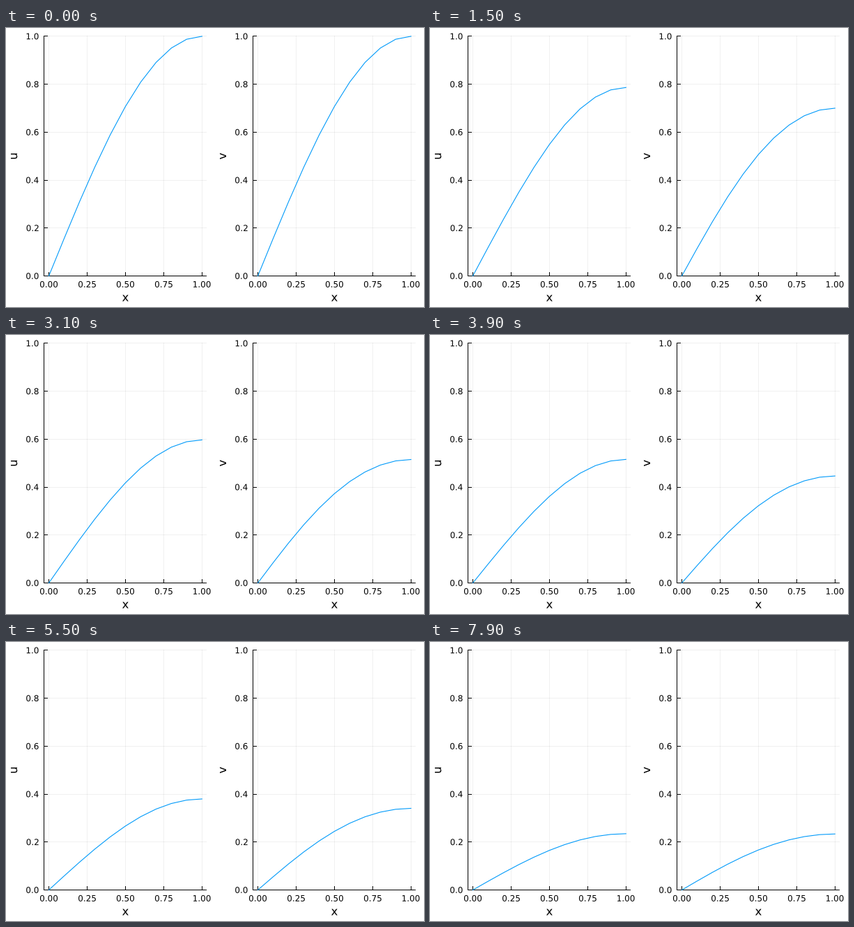
These frames come from a looping animation (600 by 400 pixels, 8 s). A matplotlib script:

```python
import numpy as np
import matplotlib.pyplot as plt
from matplotlib.animation import FuncAnimation
from matplotlib.patches import PathPatch
from matplotlib.textpath import TextPath
from matplotlib.transforms import Affine2D

DPI = 100
FRAMES, INTERVAL = 80, 100
PX = 72 / DPI                       # one pixel in points
TOP, BOTTOM, WIDTH = 11.9, 355.5, 233
LEFTS = (54.9, 354.9)
TICK_SIZE, NAME_SIZE = 12, 16.5

plt.rcParams["font.family"] = "DejaVu Sans"

# Coupled diffusion with reaction u*v, per animation step
DU, DV, RATE = 0.00914, 0.00534, 0.01041
SUB = 20
DX = 0.1
x = np.linspace(0, 1, 11)


def laplacian(w):
    out = np.zeros_like(w)
    out[1:-1] = w[2:] - 2 * w[1:-1] + w[:-2]
    out[-1] = 2 * (w[-2] - w[-1])   # zero slope at the right end
    return out / DX**2


def solve(steps):
    u = np.sin(np.pi * x / 2)
    v = u.copy()
    history = [(u, v)]
    for _ in range(steps * SUB):
        react = RATE * u * v
        u, v = (u + (DU * laplacian(u) + react) / SUB,
                v + (DV * laplacian(v) - react) / SUB)
        history.append((u, v))
    return history


def clock(i):
    """Solution time, with a slightly quicker start."""
    return i + 1.4 * (1 - np.exp(-i / 1.5))


history = solve(FRAMES + 2)

fig = plt.figure(figsize=(600 / DPI, 400 / DPI), dpi=DPI, facecolor="white")
ax = fig.add_axes([0, 0, 1, 1])
ax.set_xlim(0, 600)
ax.set_ylim(400, 0)
ax.axis("off")


def to_x(left, value):
    return left + WIDTH * (value + 0.03) / 1.06


def to_y(value):
    return BOTTOM - (BOTTOM - TOP) * value


def rule(xs, ys, alpha=1, z=2):
    """Line one pixel wide on the pixel that holds the given position."""
    ax.plot(np.floor(xs), np.floor(ys), color="black", alpha=alpha, lw=PX,
            zorder=z, solid_capstyle="projecting")


def label(px, py, s, size, align=0.5, angle=0):
    """Text outline centred vertically on py; align 0.5 centres, 1 is right."""
    path = TextPath((0, 0), s, size=size)
    box = path.get_extents()
    place = (Affine2D()
             .translate(-box.x0 - align * box.width, -(box.y0 + box.y1) / 2)
             .rotate_deg(angle).scale(1, -1).translate(px, py))
    ax.add_patch(PathPatch(path, fc="black", lw=0, zorder=4,
                           transform=place + ax.transData))


def panel(left, name):
    right = left + WIDTH
    for value in np.linspace(0, 1, 5):
        px = to_x(left, value)
        rule([px, px], [TOP, BOTTOM], alpha=0.06, z=1)
        rule([px, px], [BOTTOM, BOTTOM - 5])
        label(px, 367.4, f"{value:.2f}", TICK_SIZE)
    for value in np.linspace(0, 1, 6):
        py = to_y(value)
        rule([left, right], [py, py], alpha=0.06, z=1)
        rule([left, left + 5], [py, py])
        label(left - 8.3, py, f"{value:.1f}", TICK_SIZE, align=1)
    rule([left, left], [TOP, BOTTOM])
    rule([left, right], [BOTTOM, BOTTOM])
    label(left + WIDTH / 2, 387.2, "x", NAME_SIZE)
    label(left - 43.4, (TOP + BOTTOM) / 2, name, NAME_SIZE, angle=90)
    return ax.plot([], [], color="#009AFA", lw=1.1 * PX, zorder=3)[0]


curves = [panel(left, name) for left, name in zip(LEFTS, "uv")]


def draw(i):
    state = history[int(round(clock(i) * SUB))]
    for curve, left, w in zip(curves, LEFTS, state):
        curve.set_data(to_x(left, x), to_y(w))
    return curves


anim = FuncAnimation(fig, draw, frames=FRAMES, interval=INTERVAL,
                     repeat=True, repeat_delay=0, blit=False)
plt.show()
```
